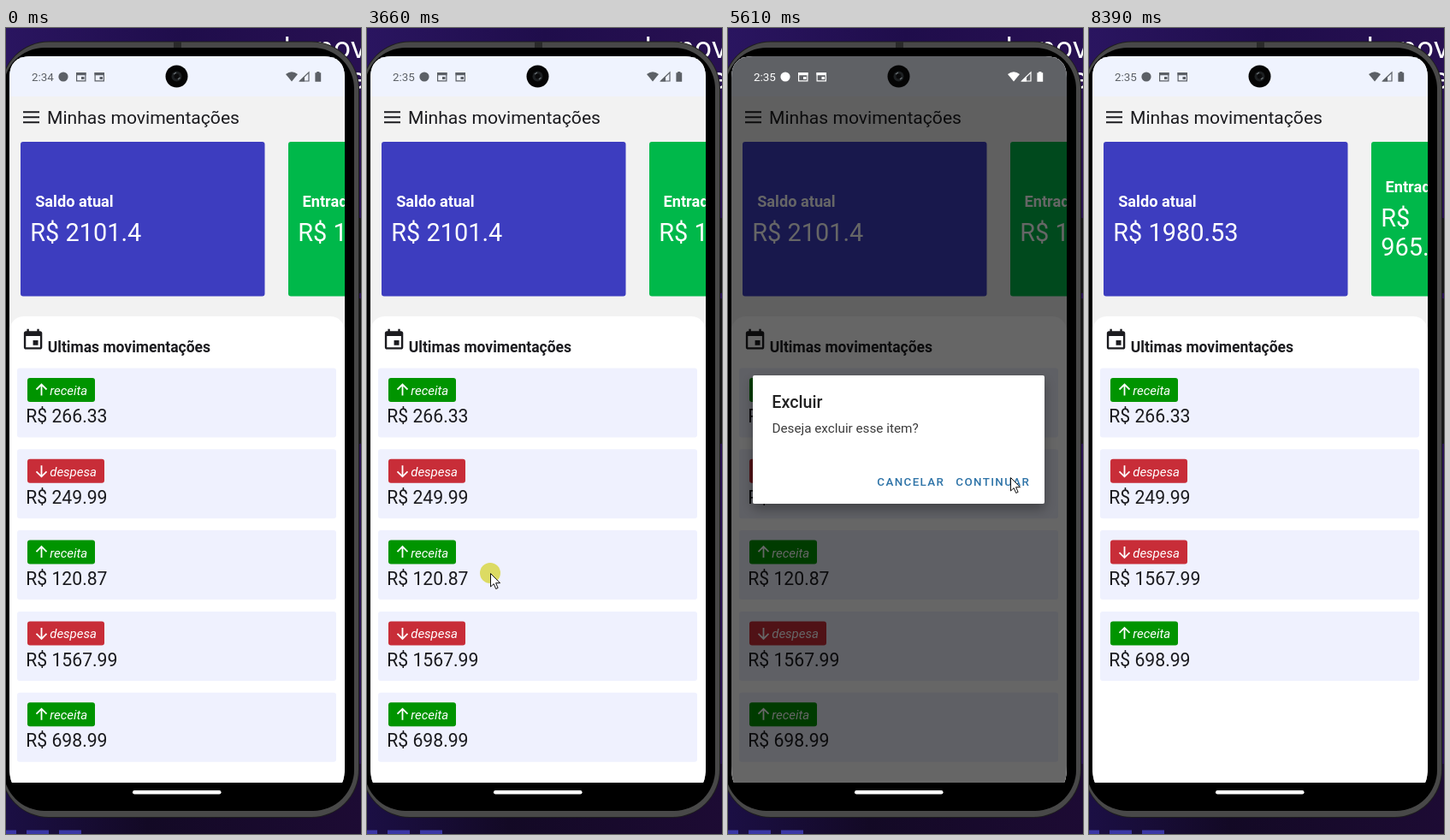
An HTML page for the animation above (9180 ms loop, 415x942 px).

```html
<!DOCTYPE html>
<html lang="pt">
<head>
<meta charset="utf-8">
<title>Minhas movimentações</title>
<style>
html, body { margin: 0; width: 100%; height: 100%; overflow: hidden; background: #12071f; }
svg { display: block; width: 415px; height: 942px; font-family: Roboto, sans-serif; }
text { white-space: pre; }
</style>
</head>
<body>
<svg id="stage" viewBox="0 0 415 942"></svg>
<script>
const LOOP = 9180;
const TICK = 67.5;

const $ = id => document.getElementById(id);
const text = (x, y, size, str, attrs = '') =>
  `<text x="${x}" y="${y}" font-size="${size}" ${attrs}>${str}</text>`;
const rect = (x, y, w, h, r, fill, attrs = '') =>
  `<rect x="${x}" y="${y}" width="${w}" height="${h}" rx="${r}" fill="${fill}" ${attrs}/>`;

const white = 'fill="#fff"';
const label = 'font-weight="700" fill="#fff"';
const action = 'font-weight="500" letter-spacing="1.4" fill="#2f74a8"';

const items = ['266.33', '-249.99', '120.87', '-1567.99', '698.99'];

const row = (item, i) => {
  const income = item[0] !== '-';
  return `
  <g transform="translate(0 ${i * 94.8})">
    ${rect(13, 397.5, 373, 81, 3, '#eff1fe')}
    ${rect(25, 409, income ? 79 : 90, 28, 3, income ? '#009400' : '#c82d38')}
    <path d="M41.5 416.5V429.5M35.5 ${income ? '422.5l6-6l6 6' : '423.5l6 6l6-6'}"
      fill="none" stroke="#fff" stroke-width="1.8"/>
    ${text(51.2, 429, 15, income ? 'receita' : 'despesa', 'font-style="italic" ' + white)}
    ${text(23.2, 461.2, 21.2, 'R$ ' + item.replace('-', ''))}
  </g>`;
};

const page = (id, list, balance, income) => `
  <g id="${id}">
    ${text(28.3, 249, 28.9, 'R$ ' + balance, white)}
    ${income}
    ${list.map(row).join('')}
  </g>`;

const feedIcon = x => `
  <g transform="translate(${x} 52)">
    <path d="M.6 .6H10.9V9.9H.6Z" fill="none" stroke="currentColor" stroke-width="1.2"/>
    <path d="M0 0H11.5V3.2H0ZM6 5H9.5V8H6Z" fill="currentColor"/>
  </g>`;

$('stage').innerHTML = `
  <defs>
    <linearGradient id="sky" x2="1">
      <stop stop-color="#2a1560"/><stop offset=".5" stop-color="#1f0d4b"/><stop offset="1" stop-color="#281052"/>
    </linearGradient>
    <linearGradient id="floor" x2="1">
      <stop stop-color="#1b0f44"/><stop offset=".4" stop-color="#130925"/><stop offset="1" stop-color="#1d0b34"/>
    </linearGradient>
    <clipPath id="screen">
      <path d="M4 58Q4 33 29 33H371Q396 33 396 58V862Q396 876 393 882H7Q4 876 4 862Z"/>
    </clipPath>
    <filter id="shadow" x="-10%" y="-10%" width="120%" height="130%">
      <feDropShadow dx="0" dy="6" stdDeviation="7" flood-opacity=".32"/>
    </filter>
  </defs>

  ${rect(0, 0, 415, 942, 0, 'url(#sky)')}
  ${rect(0, 860, 415, 82, 0, 'url(#floor)')}
  ${[-14, 24, 62].map(x => rect(x, 937.5, 26, 5, 0, '#3b37a6')).join('')}
  <g fill="#fff" font-family="Inter, sans-serif">
    ${text(312, 35, 34, 'do nov')}
    ${text(401, 71, 34, 'e')}
  </g>

  ${rect(411, 222, 4, 88, 1, '#161616')}
  ${rect(411, 316, 4, 170, 1, '#161616')}
  ${rect(-6, 15.5, 419, 907.5, 56, '#1d1d1d')}
  ${rect(-5, 16.5, 417, 905.5, 55, '#484848')}
  ${rect(-3, 23, 410, 892, 48, '#000')}
  ${rect(196, 16, 9, 7, 0, '#2a2a2a')}
  ${rect(148, 891, 103.5, 4.5, 2.2, '#fff')}

  <g clip-path="url(#screen)" fill="#1b1b1f">
    ${rect(4, 33, 392, 849, 0, '#f2f2f2')}
    ${rect(4, 33, 392, 47, 0, '#eff3fe')}
    <path d="M20 98.3H39M20 104.3H39M20 110.3H39" stroke="#1b1b1f" stroke-width="1.9"/>
    ${text(48, 112, 21.1, 'Minhas movimentações')}
    ${rect(17, 133, 285.5, 180.5, 3, '#3d3dbf')}
    ${rect(330, 133, 285.5, 180.5, 3, '#00b84a')}
    ${text(34.2, 208.5, 18.2, 'Saldo atual', label)}
    ${rect(4, 337, 392, 600, 17, '#fff')}
    <path transform="translate(17.3 350.6) scale(1.19)" d="M17 12h-5v5h5zM16 1v2H8V1H6v2H5c-1.1 0-2 .9-2 2v14c0 1.1.9 2 2 2h14c1.1 0 2-.9 2-2V5c0-1.1-.9-2-2-2h-1V1zM19 19H5V8h14z" fill-rule="evenodd"/>
    ${text(48.8, 379, 17.5, 'Ultimas movimentações', 'font-weight="700"')}
    ${page('before', items, '2101.4',
      text(346.5, 208.5, 18.2, 'Entradas', label) +
      text(341.3, 249, 28.9, 'R$ 1086.19', white))}
    ${page('after', items.filter(v => v !== '120.87'), '1980.53',
      text(346.5, 192, 18.2, 'Entradas', label) +
      text(341.3, 232, 28.9, 'R$', white) +
      text(341.3, 266, 28.9, '965.32', white))}
    ${rect(4, 33, 392, 849, 0, '#000', 'id="dim"')}
    <g id="dialog">
      ${rect(29, 406, 341, 150, 2, '#fff', 'filter="url(#shadow)"')}
      ${text(51.3, 443.5, 19.7, 'Excluir', 'font-weight="500" fill="#222"')}
      ${text(51.5, 473, 15.25, 'Deseja excluir esse item?', 'fill="#3c3c3c"')}
      ${text(174.3, 534.5, 13.34, 'CANCELAR', action)}
      ${text(266.3, 534.5, 13.34, 'CONTINUAR', action)}
    </g>
  </g>

  <g id="status" fill="currentColor">
    <text id="clock" x="30" y="61.5" font-size="13.4"></text>
    <circle cx="67" cy="57" r="5.6"/>
    ${feedIcon(82)}${feedIcon(103.5)}
    <path d="M327 54Q334 48.5 341 54L334 62.5Z"/>
    <path d="M343.5 62L354 51.8V62Z" fill="none" stroke="currentColor" stroke-width="1.2"/>
    <path d="M343 62.5L349 56.5V62.5Z"/>
    <path d="M363.2 51h3.2v1.3h1.8v10.5h-6.8V52.3h1.8Z"/>
  </g>
  <circle cx="199.5" cy="56.5" r="13" fill="#050505"/>
  <circle cx="199.5" cy="56.5" r="6" fill="#1d2022"/>
  <circle cx="199.5" cy="56.5" r="3" fill="#0b0b0c"/>
  <path d="M196 54l3-2M201 60l2.5-2" stroke="#6c7276" stroke-width="1.3"/>

  <g id="cursor">
    <circle id="press" r="12" fill="#dcdb63"/>
    <path d="M.5 .5V16L4.2 12.6L6.7 18.5L9.1 17.4L6.6 11.7H11.5Z" fill="#fff" stroke="#111"/>
  </g>`;

// Pointer strokes in ticks; bow bends a stroke sideways by a share of its length.
const strokes = [
  { from: 2, to: 15, x: 144, y: 500, bow: .18 },
  { from: 17, to: 23, x: 150, y: 424 },
  { from: 23, to: 30, x: 136, y: 673, bow: .03 },
  { from: 31, to: 35, x: 136, y: 763 },
  { from: 35, to: 37, x: 130, y: 783 },
  { from: 40, to: 47, x: 126, y: 632, bow: .12 },
  { from: 50, to: 54, x: 144, y: 637 },
  { from: 66, to: 83, x: 330, y: 525, bow: .02 },
  { from: 96, to: 97, x: 331, y: 527 },
  { from: 107, to: 114, x: 57, y: 600, bow: -.27 },
  { from: 114, to: 120, x: 172, y: 606, bow: -1 },
  { from: 120, to: 123, x: 350, y: 892 }
];

const ramp = (n, from, to) => Math.min(1, Math.max(0, (n - from) / (to - from)));
const within = (n, from, to) => n >= from && n < to;

function pointer(n) {
  let x = 342, y = 897;
  for (const s of strokes) {
    if (n < s.from) break;
    const p = ramp(n, s.from, s.to);
    const bend = 4 * p * (1 - p) * (s.bow || 0);
    const dx = s.x - x, dy = s.y - y;
    x += dx * p + dy * bend;
    y += dy * p - dx * bend;
  }
  return [x, y];
}

const show = (id, opacity) => $(id).setAttribute('opacity', +opacity);

function render(time) {
  const n = Math.floor((time % LOOP + 8) / TICK);
  $('clock').textContent = n < 50 ? '2:34' : '2:35';
  $('status').setAttribute('color', within(n, 66, 101) ? '#fff' : '#5c6066');
  show('before', n < 102);
  show('after', n >= 102);
  show('dim', .6 * (ramp(n, 64, 67) - ramp(n, 97.6, 100)));
  show('dialog', ramp(n, 64, 66) - ramp(n, 97.6, 100.1));
  show('press', within(n, 54, 66) || within(n, 96, 98));
  show('cursor', within(n, 2, 124));
  $('cursor').setAttribute('transform', `translate(${pointer(n)})`);
}

const start = performance.now();
function loop() {
  render(performance.now() - start);
  requestAnimationFrame(loop);
}
loop();
</script>
</body>
</html>
```
